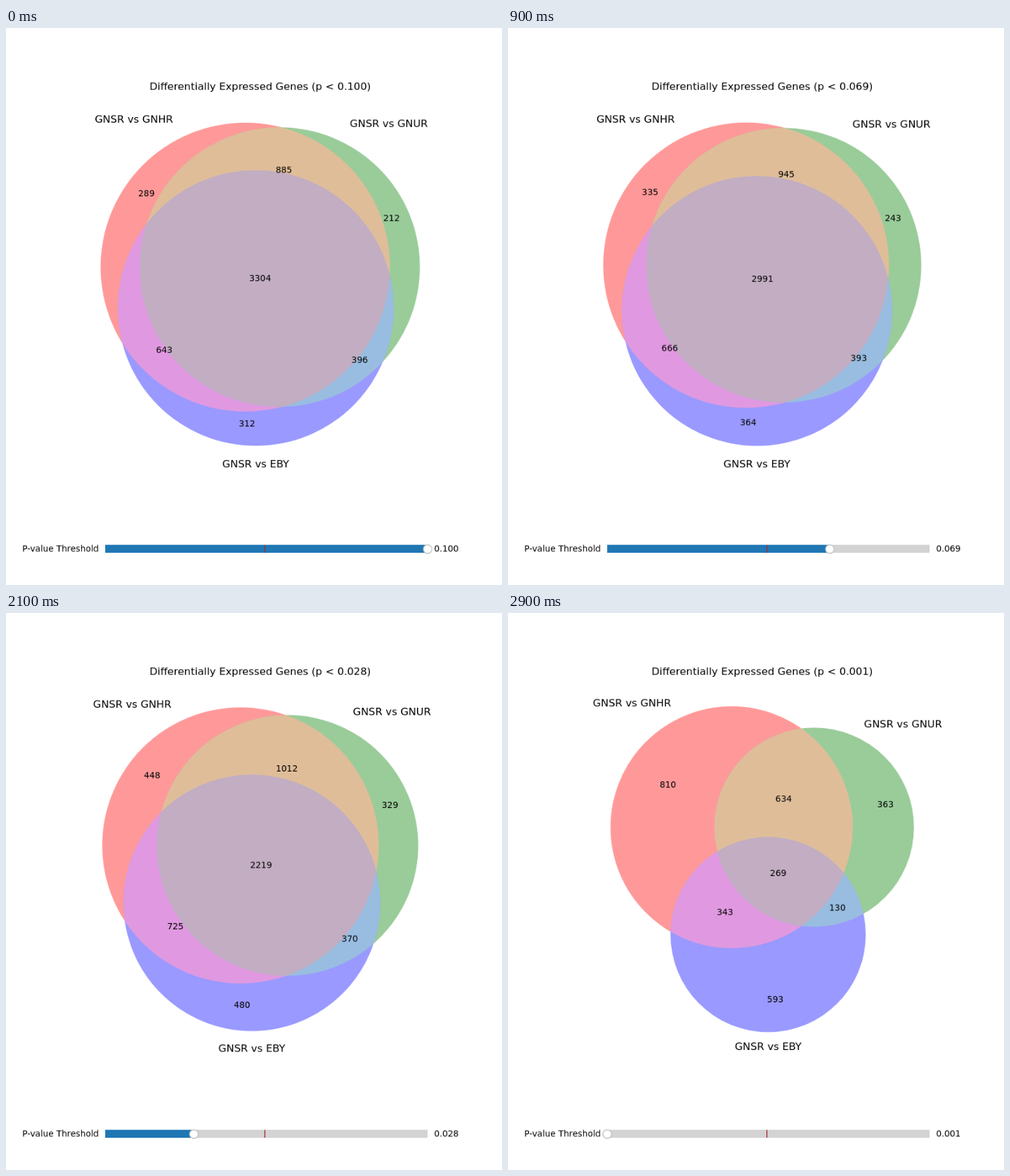
Recreate the animation shown at these times as an HTML page with a canvas. Size 706 by 794 pixels, loop 3000 ms.

```html
<!DOCTYPE html>
<html lang="en">
<head>
<meta charset="utf-8">
<title>Differentially Expressed Genes</title>
<style>
html, body { margin: 0; width: 706px; height: 794px; overflow: hidden; background: #fff; }
canvas { display: block; width: 706px; height: 794px; }
</style>
</head>
<body>
<canvas id="stage" width="800" height="900"></canvas>
<script>
// The figure is 8 x 9 inches at 100 dpi, shown scaled down to the stage.
const ctx = document.getElementById('stage').getContext('2d');
const WIDTH = 800, HEIGHT = 900, POINT = 100 / 72;
const SMALL = 10 * POINT, LARGE = 12 * POINT;
const VIEW = { x: 410, y: 414, w: 620, h: 612 };
const STEPS = 30, STEP_MS = 100, P_MIN = 0.001, P_MAX = 0.1;

// Gene counts per region at some steps; a region is a bit mask: A = 1, B = 2, C = 4.
// Columns: step, A, B, AB, C, AC, BC, ABC
const COUNTS = [
  [29, 810, 363, 634, 593, 343, 130, 269],
  [25, 546, 385, 1028, 552, 705, 349, 1686],
  [21, 448, 329, 1012, 480, 725, 370, 2219],
  [16, 387, 290, 969, 430, 704, 388, 2629],
  [12, 356, 260, 967, 390, 681, 390, 2843],
  [6, 317, 230, 921, 342, 655, 396, 3118],
  [0, 289, 212, 885, 312, 643, 396, 3304],
];
const COLORS = [, '#ff9999', '#99cc99', '#e0bd99', '#9999ff', '#e099e0', '#99bde0', '#c2adc2'];
const REGIONS = [1, 2, 4, 3, 5, 6, 7];

const threshold = step => P_MAX - (P_MAX - P_MIN) * step / (STEPS - 1);
// The counts are nearly linear in this variable.
const warp = step => threshold(step) ** 0.2;
const knots = COUNTS.map(row => warp(row[0]));

// Cubic Hermite interpolation with parabolic slopes.
function countAt(step, mask) {
  const x = warp(step), last = knots.length - 2;
  const width = i => knots[i + 1] - knots[i];
  const rise = i => (COUNTS[i + 1][mask] - COUNTS[i][mask]) / width(i);
  const inner = i => (rise(i - 1) * width(i) + rise(i) * width(i - 1)) / (width(i - 1) + width(i));
  const slope = i => i === 0 ? 2 * rise(0) - inner(1)
    : i > last ? 2 * rise(last) - inner(last) : inner(i);
  let i = 0;
  while (i < last && x > knots[i + 1]) i++;
  const h = width(i), u = (x - knots[i]) / h, v = 1 - u;
  const y0 = COUNTS[i][mask], y1 = COUNTS[i + 1][mask];
  return Math.round(v * v * (1 + 2 * u) * y0 + u * u * (1 + 2 * v) * y1
    + h * u * v * (v * slope(i) - u * slope(i + 1)));
}

function lensArea(r1, r2, d) {
  const x = (d * d + r1 * r1 - r2 * r2) / (2 * d);
  return r1 * r1 * Math.acos(x / r1) + r2 * r2 * Math.acos((d - x) / r2)
    - d * Math.sqrt(r1 * r1 - x * x);
}

function distanceFor(r1, r2, area) {
  let low = Math.abs(r1 - r2) + 1e-9, high = r1 + r2 - 1e-9;
  for (let i = 0; i < 40; i++) {
    const mid = (low + high) / 2;
    if (lensArea(r1, r2, mid) > area) low = mid; else high = mid;
  }
  return low;
}

// Area-proportional circles, fitted to the plot area.
function layout(counts) {
  const total = REGIONS.reduce((sum, m) => sum + counts[m], 0);
  const share = bits => REGIONS.reduce((sum, m) => (m & bits) === bits ? sum + counts[m] : sum, 0) / total;
  const [a, b, c] = [1, 2, 4].map(bit => Math.sqrt(share(bit) / Math.PI));
  const ab = distanceFor(a, b, share(3));
  const ac = distanceFor(a, c, share(5));
  const bc = distanceFor(b, c, share(6));
  const x = (ac * ac - bc * bc + ab * ab) / (2 * ab);
  const circles = [
    { x: 0, y: 0, r: a },
    { x: ab, y: 0, r: b },
    { x, y: Math.sqrt(ac * ac - x * x), r: c },
  ];
  const range = k => [Math.min(...circles.map(o => o[k] - o.r)), Math.max(...circles.map(o => o[k] + o.r))];
  const [x0, x1] = range('x'), [y0, y1] = range('y');
  const scale = Math.min(VIEW.w / (x1 - x0 + 0.2), VIEW.h / (y1 - y0 + 0.2));
  return circles.map(o => ({
    x: VIEW.x + (o.x - (x0 + x1) / 2) * scale,
    y: VIEW.y + (o.y - (y0 + y1) / 2) * scale,
    r: o.r * scale,
  }));
}

const contains = (o, p) => Math.hypot(p.x - o.x, p.y - o.y) < o.r;
const onCircle = (o, angle) => ({ x: o.x + o.r * Math.cos(angle), y: o.y + o.r * Math.sin(angle) });

// Angle on circle o of its crossing with q that lies inside (or outside) circle k.
function crossing(o, q, k, inside) {
  const d = Math.hypot(q.x - o.x, q.y - o.y);
  const base = Math.atan2(q.y - o.y, q.x - o.x);
  const spread = Math.acos((d * d + o.r * o.r - q.r * q.r) / (2 * d * o.r));
  return [base - spread, base + spread].find(t => contains(k, onCircle(o, t)) === inside) ?? base;
}

// Mean of the midpoints of the region's three arcs, weighted by their angles.
function labelPoint(circles, mask) {
  let x = 0, y = 0, weight = 0;
  circles.forEach((o, i) => {
    const j = (i + 1) % 3, k = (i + 2) % 3;
    const q = circles[j], s = circles[k];
    const inQ = (mask >> j & 1) === 1, inS = (mask >> k & 1) === 1;
    const from = crossing(o, q, s, inS), to = crossing(o, s, q, inQ);
    const turn = 2 * Math.PI;
    let span = ((to - from) % turn + turn) % turn;
    let mid = onCircle(o, from + span / 2);
    if (contains(q, mid) !== inQ || contains(s, mid) !== inS) {
      span = turn - span;
      mid = onCircle(o, to + span / 2);
    }
    x += mid.x * span;
    y += mid.y * span;
    weight += span;
  });
  return { x: x / weight, y: y / weight };
}

function text(string, x, baseline, size, align) {
  ctx.font = `${size}px "DejaVu Sans", sans-serif`;
  ctx.textAlign = align;
  ctx.fillStyle = '#000';
  ctx.fillText(string, x, Math.round(baseline));
}

function rect(color, x, y, w, h) {
  ctx.fillStyle = color;
  ctx.fillRect(x, y, w, h);
}

function circlePath(o) {
  ctx.beginPath();
  ctx.arc(o.x, o.y, o.r, 0, 2 * Math.PI);
}

function drawVenn(step) {
  const counts = COLORS.map((_, mask) => mask && countAt(step, mask));
  const circles = layout(counts), [a, b, c] = circles;
  for (const mask of REGIONS) {
    ctx.save();
    circles.forEach((o, i) => {
      if (mask >> i & 1) {
        circlePath(o);
        ctx.clip();
      }
    });
    rect(COLORS[mask], 0, 0, WIDTH, HEIGHT);
    ctx.restore();
  }
  for (const mask of REGIONS) {
    const p = labelPoint(circles, mask);
    text(counts[mask], p.x, p.y + 4, SMALL, 'center');
  }
  text('GNSR vs GNHR', a.x - a.r / 2, a.y - a.r, LARGE, 'right');
  text('GNSR vs GNUR', b.x + b.r / 2, b.y - b.r, LARGE, 'left');
  text('GNSR vs EBY', c.x, c.y + c.r * 1.1 + 13, LARGE, 'center');
}

function drawSlider(p) {
  const left = 160, width = 520, top = 835, height = 13, baseline = 846;
  const offset = v => Math.round(width * (v - P_MIN) / (P_MAX - P_MIN));
  rect('#d3d3d3', left, top, width, height);
  rect('#1f77b4', left, top, offset(p), height);
  rect('#a52a2a', left + offset(0.05) - 0.2, top, POINT, height);
  circlePath({ x: left + offset(p), y: 842, r: 5 * POINT });
  ctx.fillStyle = '#fff';
  ctx.fill();
  ctx.strokeStyle = '#bfbfbf';
  ctx.lineWidth = POINT;
  ctx.stroke();
  text('P-value Threshold', left - 0.02 * width, baseline, SMALL, 'right');
  text(p.toFixed(3), left + 1.02 * width, baseline, SMALL, 'left');
}

function draw() {
  const step = Math.floor(performance.now() / STEP_MS) % STEPS;
  const p = threshold(step);
  rect('#fff', 0, 0, WIDTH, HEIGHT);
  text(`Differentially Expressed Genes (p < ${p.toFixed(3)})`, VIEW.x, 99.7, LARGE, 'center');
  drawVenn(step);
  drawSlider(p);
  requestAnimationFrame(draw);
}
draw();
</script>
</body>
</html>
```
